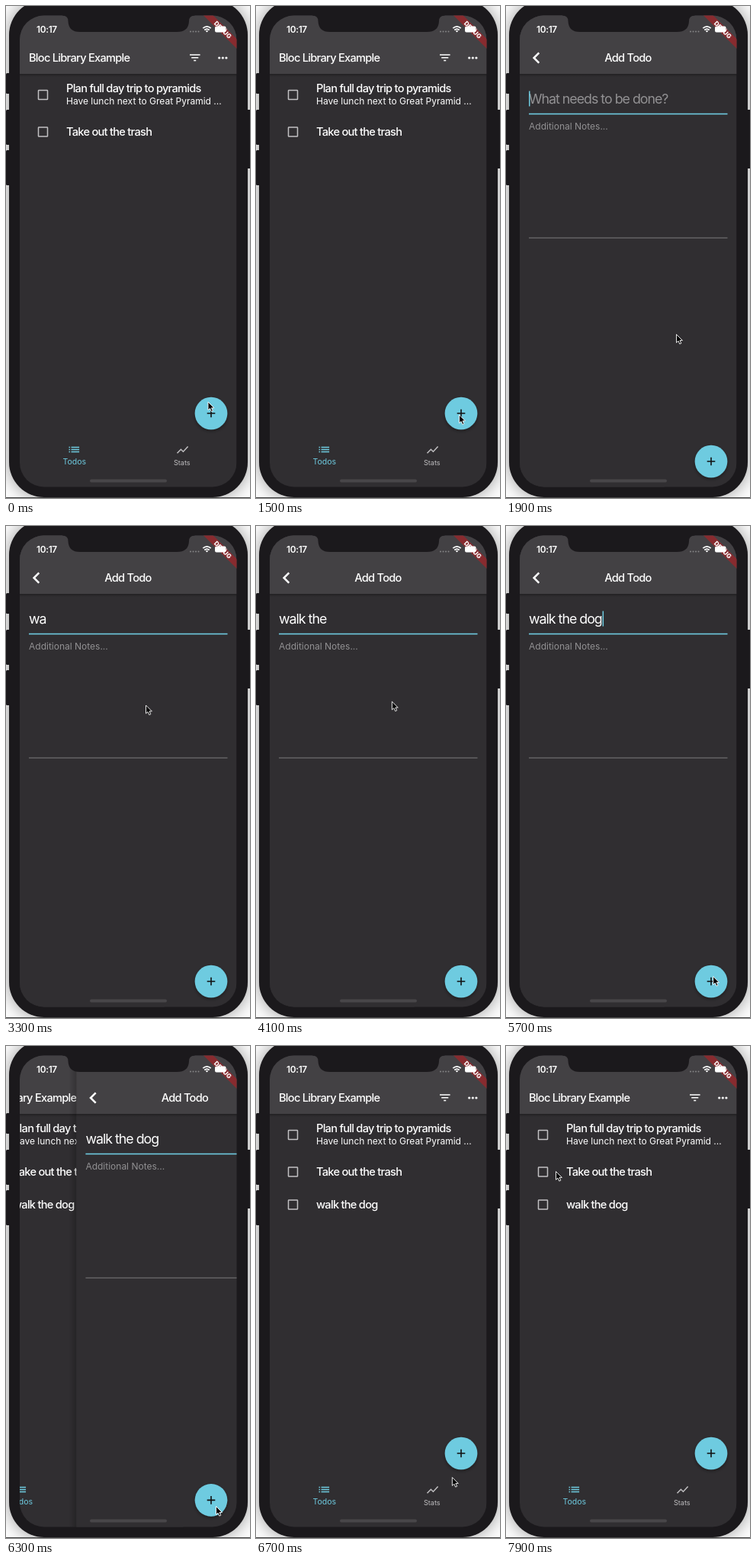
An HTML page for the animation above (8000 ms loop, 320x645 px).

```html
<!DOCTYPE html>
<html lang="en">
<head>
<meta charset="utf-8">
<title>Todo app demo</title>
<style>
  html, body { margin: 0; width: 100%; height: 100%; overflow: hidden; background: #fff; }
  svg { display: block; width: 320px; height: 645px; }
  text { font-family: Inter, Roboto, sans-serif; fill: #fff; white-space: pre; }
  .title { font-size: 14.6px; font-weight: 500; letter-spacing: -.72px; }
  .input { font-size: 17.8px; letter-spacing: -1px; }
  .note { font-size: 12px; }
  .hint { fill: #929193; }
  .cyan { fill: #6ecbe0; }
  .clock { font-size: 11.8px; font-weight: 600; letter-spacing: -.3px; }
  .debug { font: 800 8.2px Inter, Roboto, sans-serif; text-anchor: middle; }
  .line { fill: none; stroke: #fff; }
  .active { stroke: #6ecbe0; }
  .idle { stroke: #bfbec0; }
</style>
</head>
<body>
<svg viewBox="0 0 320 645">
  <defs>
    <clipPath id="screen"><rect x="18" y="12.5" width="284.5" height="618" rx="32"/></clipPath>
    <linearGradient id="edge"><stop offset="0" stop-opacity="0"/><stop offset="1" stop-opacity=".22"/></linearGradient>
    <linearGradient id="drop" x2="0" y2="1"><stop offset="0" stop-opacity=".3"/><stop offset="1" stop-opacity="0"/></linearGradient>
    <filter id="soft" x="-30%" y="-30%" width="160%" height="160%">
      <feDropShadow dx="0" dy="2" stdDeviation="2" flood-opacity=".4"/>
    </filter>
    <filter id="blur" x="-20%" y="-10%" width="140%" height="120%"><feGaussianBlur stdDeviation="12"/></filter>
    <g id="page">
      <rect x="18" y="12" width="284.5" height="619" fill="#302e31"/>
      <rect x="18" y="12" width="284.5" height="77" fill="#434144"/>
      <rect x="18" y="89" width="284.5" height="4" fill="url(#drop)"/>
    </g>
    <rect id="box" x="42.5" y="-6" width="12" height="12" rx=".6" fill="none" stroke="#c2c1c3" stroke-width="1.5"/>
  </defs>

  <!-- phone body -->
  <rect width="320" height="645" fill="#fff"/>
  <rect x="4" y="-8" width="313" height="652" rx="46" opacity=".42" filter="url(#blur)"/>
  <g fill="#1b191c">
    <rect x="0" y="88" width="6" height="27" rx="1.5"/>
    <rect x="0" y="136" width="6" height="46" rx="1.5"/>
    <rect x="0" y="189" width="6" height="46" rx="1.5"/>
    <rect x="315" y="136" width="6" height="77"/>
    <rect x="4" y="-8" width="313" height="652" rx="46"/>
    <rect y="644" width="320" height="1" fill="#444"/>
  </g>

  <g clip-path="url(#screen)">
    <g id="home">
      <use href="#page"/>
      <text class="title" x="30" y="73">Bloc Library Example</text>
      <path class="line" stroke-width="1.5" d="M241 64h13.6M243.2 67.8h9.1M246.2 71.6h3"/>
      <g fill="#fff"><circle cx="279.7" cy="68" r="1.6"/><circle cx="284.3" cy="68" r="1.6"/><circle cx="288.9" cy="68" r="1.6"/></g>

      <use href="#box" y="116.5"/>
      <text class="title" x="79" y="113">Plan full day trip to pyramids</text>
      <text class="note" x="79" y="129">Have lunch next to Great Pyramid ...</text>
      <use href="#box" y="165"/>
      <text class="title" x="79" y="170">Take out the trash</text>
      <g id="added">
        <use href="#box" y="208"/>
        <text class="title" x="79" y="213">walk the dog</text>
      </g>

      <path class="line active" stroke-width="1.5"
        d="M82.5 578.5H84M82.5 581.5H84M82.5 584.5H84M85.5 578.5h10.6M85.5 581.5h10.6M85.5 584.5h10.6"/>
      <text class="cyan" x="74.5" y="601" font-size="10.5">Todos</text>
      <path class="line idle" stroke-width="1.5" d="M224.5 586.2l4.9-5 3 3 6.2-6.8"/>
      <text x="220" y="602" font-size="9.1" style="fill:#bfbec0">Stats</text>
    </g>

    <g id="add">
      <rect x="8" y="12" width="10" height="619" fill="url(#edge)"/>
      <use href="#page"/>
      <path class="line" stroke-width="2.5" d="M43.3 61.3L36.6 68l6.7 6.7"/>
      <text class="title" x="160" y="73" text-anchor="middle">Add Todo</text>
      <text class="input hint" id="hint" x="30" y="128">What needs to be done?</text>
      <text class="input" id="typed" x="30" y="128"></text>
      <rect class="cyan" id="caret" y="111.5" width="1.5" height="20"/>
      <rect class="cyan" x="30" y="140.7" width="260.5" height="1.6"/>
      <text class="note hint" x="30" y="162">Additional Notes...</text>
      <rect x="30" y="303.5" width="260.5" height="1" fill="#7d7c7e"/>
    </g>

    <g id="fab">
      <circle class="cyan" r="21.3" filter="url(#soft)"/>
      <path d="M-5.3 0H5.3M0-5.3V5.3" stroke="#111" stroke-width="1.6"/>
    </g>

    <g transform="translate(302.5 13) rotate(45)">
      <rect x="-45" y="21.2" width="90" height="9.1" fill="#872b2f"/>
      <text class="debug" y="28.7">DEBUG</text>
    </g>
    <rect x="110" y="620.5" width="101" height="4" rx="2" fill="#484649"/>
  </g>

  <!-- notch and status bar -->
  <path fill="#1b191c" d="M74 12V12.5q7.500 0 7.500 7.500Q82 34 97 34H224q15.500 0 16-14 0-7.500 7.500-7.500V12z"/>
  <text class="clock" x="40" y="35">10:17</text>
  <g fill="#858486"><circle cx="242" cy="33.500" r="1"/><circle cx="245.500" cy="33.500" r="1"/><circle cx="249" cy="33.500" r="1"/><circle cx="252.500" cy="33.500" r="1"/></g>
  <path class="line" stroke-width="1.700" d="M258.300 29.200q5.200-4.800 10.400 0M260.300 31.500q3.200-2.800 6.400 0"/>
  <path fill="#fff" d="M261.700 32.700q1.800-1.400 3.600 0l-1.800 1.900z"/>
  <rect x="274" y="26.500" width="14.500" height="8" rx="2" fill="#fff"/>
  <path fill="#fff" d="M289.300 29q1.400 1.500 0 3z"/>

  <path id="cursor" d="M0 0V10.800L2.500 8.600 4.300 12.600 6.300 11.700 4.500 7.900H7.900z" fill="#000" stroke="#fff" stroke-width=".9" stroke-linejoin="round"/>
</svg>

<script>
  const LOOP = 8000, STEP = 100, WIDTH = 284.5;
  const PUSH = 1500, POP = 6260, SLIDE = 400;
  const TASK = 'walk the dog', TYPE_START = 3150, KEY_GAP = 130;

  // time, x, y of the pointer tip
  const PATH = [
    [0, 265, 519], [700, 266, 530], [1300, 266.5, 536], [1650, 266.5, 536],
    [1900, 223.5, 430.5], [2400, 188, 248], [3000, 183.5, 235], [3800, 183.5, 235],
    [4700, 162, 214.5], [5000, 162, 214.5], [5800, 275.5, 603.5], [6500, 275.5, 603.5],
    [7500, 65.5, 164.5], [8000, 65.5, 164.5]
  ];

  const el = id => document.getElementById(id);
  const clamp = v => Math.min(1, Math.max(0, v));
  const move = (id, x, y) => el(id).setAttribute('transform', `translate(${x} ${y})`);
  const show = (id, on) => el(id).setAttribute('visibility', on ? 'inherit' : 'hidden');

  function bezier(x1, y1, x2, y2) {
    const at = (a, b, s) => 3 * a * s * (1 - s) ** 2 + 3 * b * s * s * (1 - s) + s ** 3;
    return x => {
      if (x <= 0 || x >= 1) return clamp(x);
      let lo = 0, hi = 1;
      for (let i = 0; i < 24; i++) {
        const mid = (lo + hi) / 2;
        if (at(x1, x2, mid) < x) lo = mid; else hi = mid;
      }
      return at(y1, y2, lo);
    };
  }
  const slide = bezier(.35, .91, .33, .97);
  const glide = bezier(.4, 0, .2, 1);
  const smooth = bezier(.4, 0, .6, 1);

  function pointer(t) {
    const i = PATH.findIndex((p, n) => n === PATH.length - 1 || t < PATH[n + 1][0]);
    const a = PATH[i], b = PATH[i + 1] || a;
    const k = smooth((t - a[0]) / (b[0] - a[0] || 1));
    return [a[1] + (b[1] - a[1]) * k, a[2] + (b[2] - a[2]) * k];
  }

  function draw(t) {
    const opening = clamp((t - PUSH) / SLIDE), closing = clamp((t - POP) / SLIDE);
    const open = slide(opening) - slide(closing);
    move('home', -open * WIDTH / 3, 0);
    move('add', (1 - open) * WIDTH, 0);
    show('add', open > 0);
    move('fab', 269, 534 + 63 * (glide(opening) - glide(closing)));
    show('added', t >= POP);

    const count = t < TYPE_START ? 0 : Math.min(TASK.length, 1 + Math.floor((t - TYPE_START) / KEY_GAP));
    const typed = el('typed');
    typed.textContent = TASK.slice(0, count);
    show('hint', !count);
    el('caret').setAttribute('x', 30 + (count ? typed.getComputedTextLength() + .8 : 0));
    show('caret', t > PUSH && t < POP && (t - 1600 + LOOP) % 1000 < 500);
    move('cursor', ...pointer(t));
  }

  function tick() {
    draw(Math.floor(performance.now() % LOOP / STEP) * STEP);
    requestAnimationFrame(tick);
  }
  tick();
</script>
</body>
</html>
```
